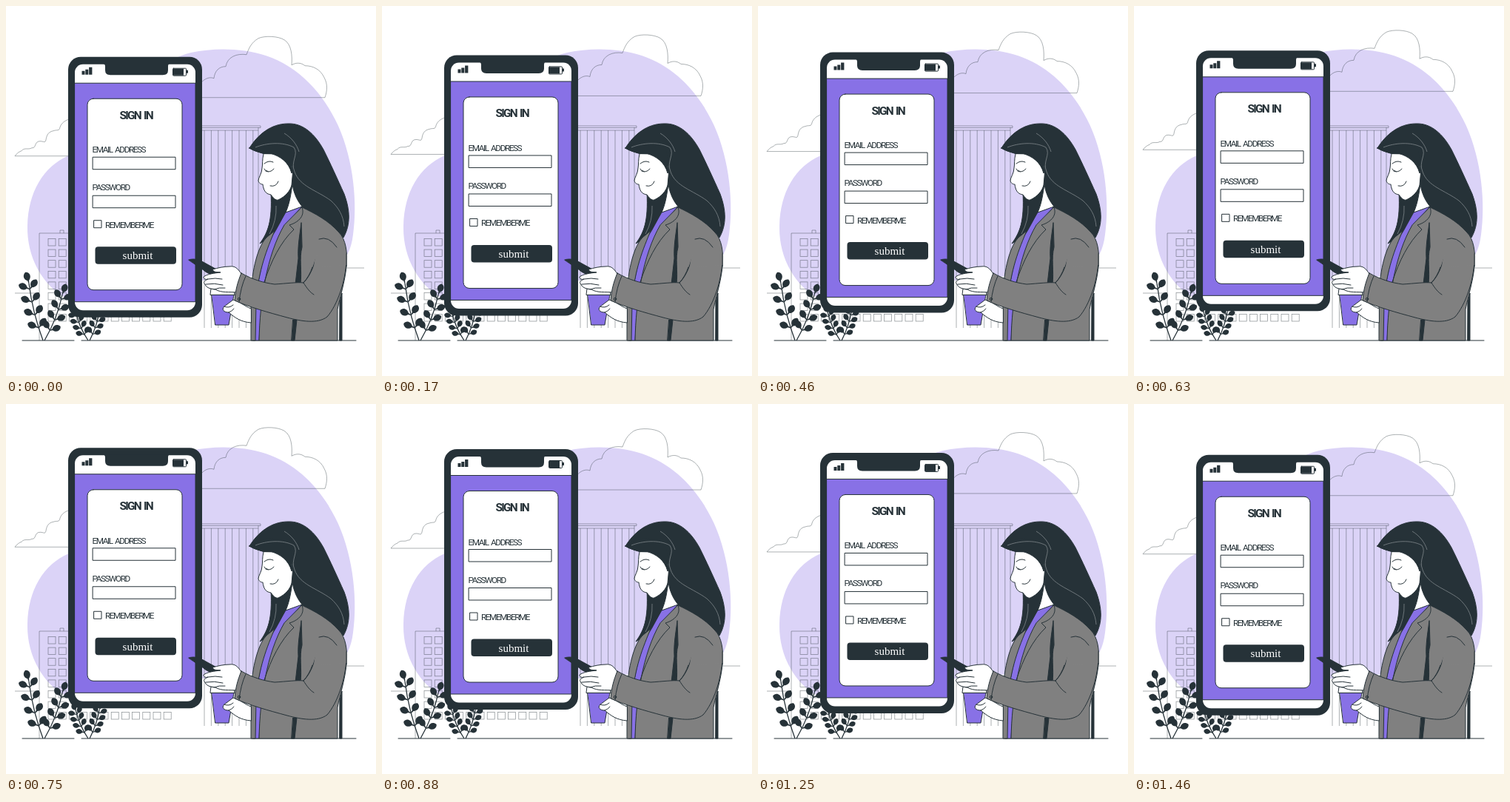
Recreate the animation shown at these times as an HTML page. Size 500 px wide and 500 px high, loop 1500 ms.

```html
<!DOCTYPE html>
<html lang="en">
<head>
<meta charset="utf-8">
<title>Sign in</title>
<style>
html, body { margin: 0; width: 100%; height: 100%; overflow: hidden; background: #fff; }
svg { display: block; width: 100%; height: 100%; }
.thin { fill: none; stroke: #263238; stroke-opacity: .55; stroke-width: .7; }
.ink { stroke: #263238; stroke-width: 1; stroke-linejoin: round; stroke-linecap: round; }
.dark { fill: #263238; }
.white { fill: #fff; }
.violet { fill: #8871e6; }
.gray { fill: #808080; }
.none { fill: none; }
.label { font: 11.8px Roboto, sans-serif; letter-spacing: -1.45px; word-spacing: 2px; }
.title { font: bold 15.5px Roboto, sans-serif; letter-spacing: -1.8px; word-spacing: 2px; }
.button { font: 15px "Liberation Serif", serif; }
</style>
</head>
<body>
<svg viewBox="0 0 500 500">
  <path fill="#dbd3f7" d="M250 63C283 56 320 57 351 67C396 82 429 118 449 162C470 209 475 267 469 309C464 350 440 365 400 365C350 365 310 364 265 371C205 400 130 414 85 397C48 378 28 338 29 297C30 252 50 217 85 202C140 178 180 79 250 63Z"/>

  <g id="city" class="thin">
    <path d="M12 388H45M45 452V307H86M73 307V303H78V307M460 354H484M264 162H344V164.500H264M264 168H341M341 164V435"/>
  </g>

  <g class="floating thin">
    <path d="M12 203H86M12 203C15 199 18 197 21 196C25 191 30 195 35 192C41 193 38 183 46 183C51 183 53 186 54 181C55 174 58 170 64 169C69 167 72 170 73 164C75 158 80 155 86 153"/>
    <path d="M262 124H431C434 115 435 106 430 97C425 86 415 81 404 81C398 76 391 77 386 80C387 68 386 52 376 46C368 41 350 40 341 44C331 50 328 58 325 66C312 64 299 69 297 82C288 82 282 88 281 98C274 95 266 100 262 106"/>
  </g>

  <path class="ink none" d="M22 452H92M102 452H473"/>
  <g id="plants" class="dark"></g>

  <g class="floating">
    <rect class="dark" x="84" y="69" width="181" height="352" rx="17"/>
    <rect class="white" x="93" y="79" width="163" height="332.500" rx="11"/>
    <path class="violet ink" d="M93 104.500H256V400H93Z"/>
    <path class="dark" d="M130 78H222Q219 78 219 82V87Q219 93.500 212 93.500H141Q134 93.500 134 87V82Q134 78 130 78Z"/>
    <path class="dark" d="M102.500 88h4v5h-4zM107.300 86h4v7h-4zM112.100 83h4.300v10h-4.300zM244 87h2v4h-2z"/>
    <rect class="white ink" x="225.500" y="84.500" width="18" height="10" rx="1"/>
    <rect class="dark" x="226" y="85" width="14" height="9"/>
    <rect class="white ink" x="110" y="125.500" width="128" height="258.500" rx="8"/>
    <text class="dark title" x="153.500" y="153">SIGN IN</text>
    <text class="dark label" x="116.500" y="198.500">EMAIL ADDRESS</text>
    <text class="dark label" x="116.500" y="249.500">PASSWORD</text>
    <text class="dark label" x="134" y="300">REMEMBERME</text>
    <path class="white ink" d="M117.500 204.500H229V221H117.500ZM117.500 256.500H229V273H117.500ZM119 290H129V300H119Z"/>
    <rect class="dark" x="120.500" y="325.500" width="109.500" height="23.500" rx="4"/>
    <text class="white button" x="178" y="342.500" text-anchor="middle">submit</text>
  </g>

  <g class="ink">
    <!-- hair, neck and face -->
    <path class="dark" d="M329 192C340 174 358 159 381 159C402 158 418 174 429 194C438 212 448 234 457 254C465 276 466 295 456 313C438 291 414 280 398 271L383 276C377 298 361 312 343 321C354 306 360 291 358 252L372 205C355 202 340 198 329 192Z"/>
    <path class="white" d="M387 241C385 253 384 265 378 279L386 277L401 272C394 264 389 254 387 241Z"/>
    <path class="white" d="M348 200C346 208 347 214 346 219C346 226 341 232 341 236C342 240 345 241 347 241C348 248 350 254 358 255C361 259 364 263 368 262C378 257 384 250 386 242L388 220C387 209 378 203 365 200Z"/>
    <path class="dark" d="M329 192C345 180 365 178 379 186C388 196 384 210 388 222L386 226C382 211 371 203 357 199C343 199 335 196 329 192Z"/>
    <path class="none" d="M349 213Q355 208 361 211M351 223Q357 226 362 220M351 223L349 220M354 224L352 222M357 243Q365 245 368 237"/>

    <!-- shirt and jacket -->
    <path class="violet" d="M378 279L400 271L384 290C360 325 346 370 342 452H333C334 400 345 330 364 304Z"/>
    <path class="gray" d="M363 304C353 328 341 356 338 400L337 452H331V392C332 356 341 322 353 312Z"/>
    <path class="gray" d="M400 272C417 280 436 290 450 306C459 315 462 333 460 352C458 373 451 394 448 410V452H342C343 399 352 337 376 296Z"/>
    <path class="dark" d="M399 293C397 310 394 324 395 341L391 376H398C400 358 396 341 400 326Z"/>
    <path class="dark" d="M388 424H393L390 452H386ZM451 400L454 388V452H451Z"/>
    <path class="none" d="M400 272C405 285 393 293 383 296L389 302C371 319 358 345 349 373M423 315Q436 310 447 326"/>
  </g>

  <g class="ink">
    <!-- cup and hands -->
    <path class="violet" d="M278 390H308L301 431H283Z"/>
    <path class="white" d="M276 390L277 382H307L309 390Z"/>
    <path class="white" d="M331 428C317 427 309 421 301 414C294 414 291 410 295 406L307 397C314 398 321 405 331 409Z"/>
    <path class="none" d="M301 414Q305 413 308 409M295 406Q301 409 307 404"/>
    <path class="dark" d="M247 343Q252 341 261 343L292 360L281 363Q272 362 267 357Z"/>
    <path class="white" d="M318 362C313 354 309 351 302 352C294 352 286 354 279 356C281 361 287 359 290 360C282 361 272 362 267 366C267 369 270 370 273 369C268 371 266 374 269 376C271 382 278 382 283 383C291 388 302 386 311 387Z"/>
    <path class="none" d="M273 369Q283 367 292 369M270 376Q282 374 293 377M281 383Q288 380 296 381"/>
    <path class="gray" d="M318 361C334 370 348 374 363 376C379 375 393 373 402 374C412 364 416 350 419 340L460 344C459 371 448 404 434 420C421 430 399 426 380 421C354 414 329 407 309 398C310 384 313 373 318 361Z"/>
    <path d="M418 338L461 335V350L416 352Z" fill="#808080" stroke="none"/>
    <path class="none" d="M460 335V352M402 374C407 382 411 387 416 390M324 365Q317 380 315 400M402 374Q410 365 414 353"/>
    <circle class="none" cx="315" cy="396" r="1.700"/>
  </g>

  <path fill="none" stroke="#7f878b" stroke-width=".8" d="M337 191C352 185 374 183 389 191C396 201 384 210 390 224C397 244 420 249 439 263C449 272 456 283 457 298M376 172C386 178 393 187 396 197M365 270Q366 290 356 308"/>
</svg>
<script>
const NS = 'http://www.w3.org/2000/svg';
const add = (parent, tag, attrs) => {
  const el = document.createElementNS(NS, tag);
  for (const key in attrs) el.setAttribute(key, attrs[key]);
  parent.append(el);
};

const city = document.getElementById('city');
const addWindow = (x, y) => add(city, 'rect', { x, y, width: 10, height: 9.5 });
for (let row = 0; row < 7; row++)
  for (let col = 0; col < 2; col++) addWindow(57 + col * 14.2, 314.5 + row * 14.6);
for (let col = 0; col < 12; col++) addWindow(57 + col * 14.2, 416.5);
for (let i = 0; i < 8; i++) add(city, 'path', { d: `M${268 + i * 9.4} 168V435` });

const plants = document.getElementById('plants');
function addStem(x0, y0, x1, y1, pairs, size) {
  const bendX = x1 + (x0 - x1) * .25, bendY = (y0 + y1) / 2;
  add(plants, 'path', {
    d: `M${x0} ${y0}Q${bendX} ${bendY} ${x1} ${y1}`,
    fill: 'none', stroke: '#263238', 'stroke-width': 1.3
  });
  const addLeaf = (x, y, angle) => add(plants, 'path', {
    d: 'M0 -.5L4 -1C7 -6 13 -6 16 -1C15 5 8 6 4 1L0 .5Z',
    transform: `translate(${x} ${y}) rotate(${angle}) scale(${size})`
  });
  const lean = Math.atan2(y1 - y0, x1 - x0) * 180 / Math.PI;
  for (let i = 0; i < pairs; i++) {
    const u = .22 + .68 * i / (pairs - 1), v = 1 - u;
    const x = v * v * x0 + 2 * u * v * bendX + u * u * x1;
    const y = v * v * y0 + 2 * u * v * bendY + u * u * y1;
    addLeaf(x, y, lean - 52);
    addLeaf(x, y, lean + 52);
  }
  addLeaf(x1, y1, lean);
}
addStem(50, 452, 31, 375, 4, 1);
addStem(52, 452, 76, 390, 4, .95);
addStem(111, 452, 95, 416, 4, .75);
addStem(113, 452, 126, 414, 4, .75);

const PERIOD = 1500, LIFT = 10, PHASE = 20;
const floating = document.querySelectorAll('.floating');
const start = performance.now();
function draw() {
  const u = ((performance.now() - start + PHASE) % PERIOD) / PERIOD;
  const y = -LIFT * (1 - Math.abs(2 * u - 1));
  floating.forEach(el => el.setAttribute('transform', `translate(0 ${y})`));
  requestAnimationFrame(draw);
}
draw();
</script>
</body>
</html>
```
